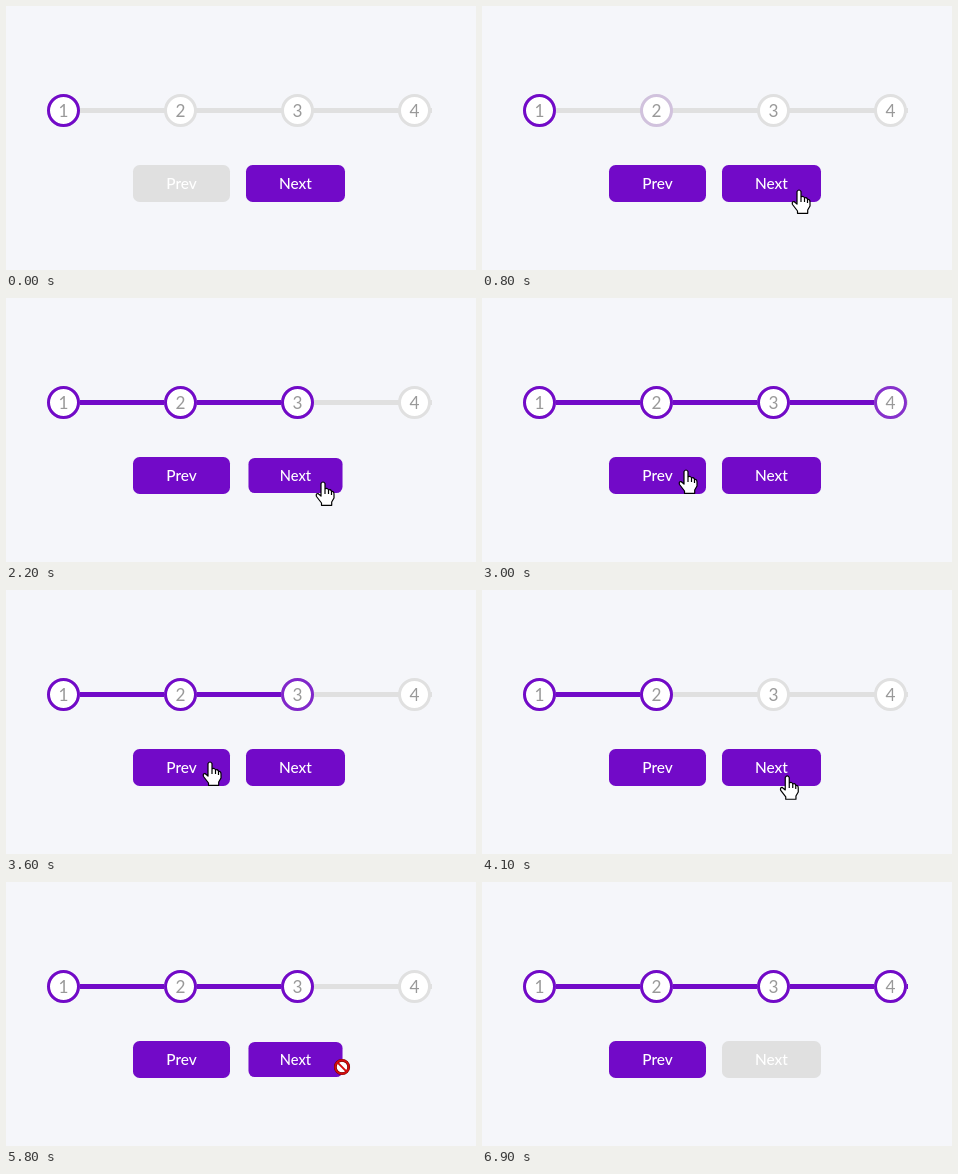
Recreate the animation shown at these times as an HTML page. Size 470 by 264 pixels, loop 7.2 s.

```html
<!DOCTYPE html>
<html lang="en">
<head>
<meta charset="utf-8">
<title>Progress steps</title>
<style>
  html, body { margin: 0; width: 100%; height: 100%; overflow: hidden; background: #f5f6fa; }
  svg { display: block; width: 100vw; height: 100vh; }
  text { font: 500 15.4px Lato, sans-serif; text-anchor: middle; fill: #fff; }
  .steps text { font-size: 17.2px; font-weight: 400; fill: #999; }
  .steps circle { fill: #fff; stroke: #e0e0e0; stroke-width: 3; }
  .steps .active { fill: none; stroke: #720ac8; }
</style>
</head>
<body>
<svg viewBox="0 0 470 264">
  <rect x="41" y="102" width="385" height="5" fill="#e0e0e0"/>
  <rect id="bar" x="41" y="102" height="5" fill="#720ac8"/>
  <g class="steps" id="steps"></g>
  <g id="prev"><rect x="127" y="159" width="97" height="37" rx="6.6"/><text x="175.5" y="183">Prev</text></g>
  <g id="next"><rect x="240" y="159" width="99" height="37" rx="6.6"/><text x="289.5" y="183">Next</text></g>
  <g id="cursor">
    <path id="arrow" d="M0 0V16.5L3.8 13L6.4 19L9 17.9L6.4 12H11.6Z" fill="#fff" stroke="#000"/>
    <path id="hand" d="M-2 1.5Q0-1.5 2 1.5V7Q4.5 5.5 5.5 8Q8 7 8.5 9.5Q11 9 11 12V16L8.7 20V23.3H-1.5V21L-6.5 14.5Q-7.5 11.5-5 11.5L-2 14Z M2 7V12M5.5 8V12M8.5 9.5V13" fill="#fff" stroke="#000" stroke-width="1.2" stroke-linejoin="round"/>
    <g id="blocked" fill="none">
      <circle r="6.7" fill="#fff" stroke="#500" stroke-width="2.8"/>
      <path d="M-4.6-4.6L4.6 4.6M6.7 0A6.7 6.7 0 1 1-6.7 0A6.7 6.7 0 1 1 6.7 0" stroke="#d40c0c" stroke-width="2"/>
    </g>
  </g>
</svg>
<script>
const $ = id => document.getElementById(id);
const LOOP = 7200, TICK = 100, FADE = 400, PRESS = 130, TRAVEL = 600, BOW = 10;

const spots = { outside: [450, 262], prev: [204, 172], next: [317, 184], edge: [336, 185], below: [242, 268] };
const clicks = [
  [750, 'next'], [1500, 'next'], [2270, 'next'], [2940, 'prev'], [3550, 'prev'],
  [4350, 'next'], [4880, 'prev'], [5380, 'next'], [5815, 'edge']
].map(([time, spot]) => ({ time, spot, delta: spot === 'prev' ? -1 : 1 }));
const stops = [{ time: 0, spot: 'outside' }, ...clicks, { time: 6950, spot: 'below' }];

const centre = i => 57.5 + 117 * i;
$('steps').innerHTML = [0, 1, 2, 3].map(i => {
  const at = `cx="${centre(i)}" cy="104.5" r="15"`;
  return `<circle ${at}/><circle class="active" ${at}/><text x="${centre(i)}" y="110.7">${i + 1}</text>`;
}).join('');
const rings = document.querySelectorAll('.active');

const clamp = v => Math.min(1, Math.max(0, v));
const mix = (a, b, k) => a + (b - a) * k;
const smooth = k => k * k * (3 - 2 * k);
const bezier = (a, b, s) => 3 * a * s * (1 - s) ** 2 + 3 * b * s * s * (1 - s) + s ** 3;

// CSS "ease" timing, solved by bisection
function ease(x) {
  let lo = 0, hi = 1;
  for (let i = 0; i < 20; i++) {
    const mid = (lo + hi) / 2;
    if (bezier(.25, .25, mid) < x) lo = mid; else hi = mid;
  }
  return bezier(.1, 1, lo);
}

const stepAt = t => clicks.reduce((step, c) => step + (t >= c.time ? c.delta : 0), 0);
const progressAt = t => clicks.reduce((p, c) => p + c.delta * ease(clamp((t - c.time) / FADE)), 0);

// After each click the pointer glides to the next spot, sagging a little on the way
function pointerAt(t) {
  const i = stops.findIndex(stop => stop.time > t);
  if (i < 1) return null;
  const from = stops[i - 1], to = stops[i], arrive = to.time - PRESS;
  const start = Math.max(from.time, arrive - TRAVEL);
  const k = smooth(clamp((t - start) / (arrive - start)));
  if (from.spot === 'outside' && !k || to.spot === 'below' && k === 1) return null;
  const [x0, y0] = spots[from.spot], [x1, y1] = spots[to.spot];
  const sag = from.spot === to.spot ? 0 : BOW * Math.sin(Math.PI * k);
  return [mix(x0, x1, k), mix(y0, y1, k) + sag];
}

function drawButton(id, cx, disabled, pressed) {
  $(id).setAttribute('fill', disabled ? '#e0e0e0' : '#720ac8');
  $(id).setAttribute('transform', pressed ? `translate(${cx} 177.5) scale(.95) translate(${-cx} -177.5)` : '');
}

function drawPointer(t) {
  const at = pointerAt(t);
  $('cursor').style.display = at ? '' : 'none';
  if (!at) return;
  const [x, y] = at, inRow = y > 159 && y < 196;
  const onPrev = inRow && x > 127 && x < 224, onNext = inRow && x > 240 && x < 339;
  // The pointer shape updates slightly ahead of the page
  const step = stepAt(t + 20);
  const shape = onPrev && step === 0 || onNext && step === 3 ? 'blocked' : onPrev || onNext ? 'hand' : 'arrow';
  for (const id of ['arrow', 'hand', 'blocked']) $(id).style.display = id === shape ? '' : 'none';
  $('cursor').setAttribute('transform', `translate(${x} ${y})`);
}

function draw(now) {
  const t = Math.floor(now % LOOP / TICK) * TICK;
  const progress = progressAt(t), step = stepAt(t);
  $('bar').setAttribute('width', 385 * clamp(progress / 3));
  rings.forEach((ring, i) => ring.setAttribute('opacity', clamp(progress - i + 1)));

  const press = clicks.find(c => t < c.time && t >= c.time - PRESS);
  drawButton('prev', 175.5, step === 0, press && press.delta < 0);
  drawButton('next', 289.5, step === 3, press && press.delta > 0);
  drawPointer(t);
  requestAnimationFrame(draw);
}
draw(0);
</script>
</body>
</html>
```
